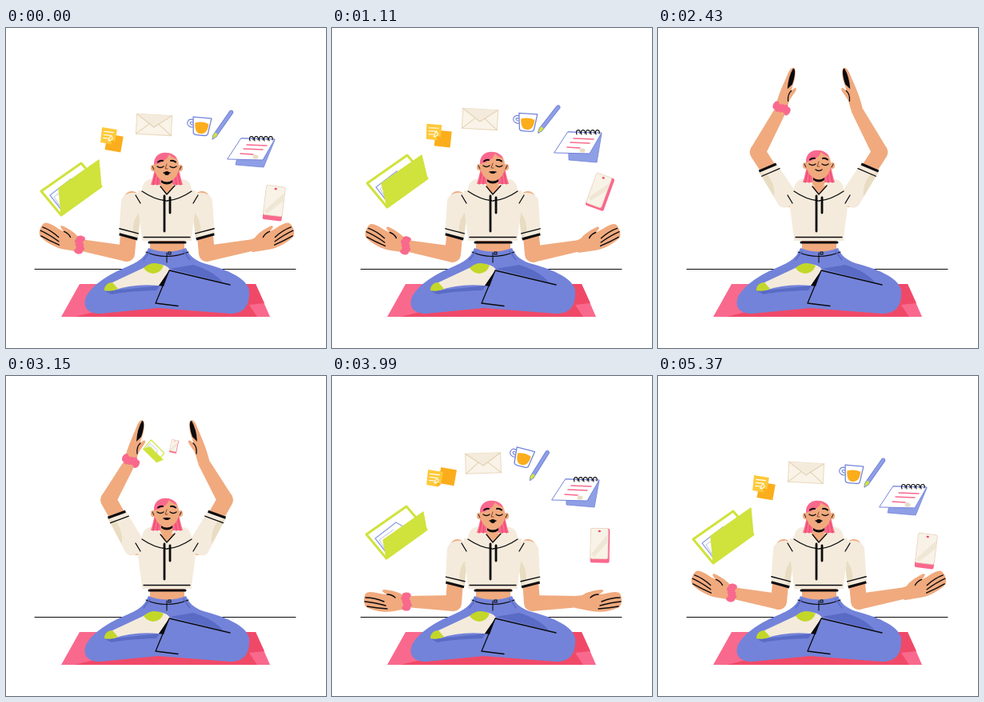
Recreate the animation shown at these times as an HTML page with a canvas. Size 400 px wide and 400 px high, loop 5400 ms.

```html
<!DOCTYPE html>
<html>
<head>
<meta charset="utf-8">
<title>Calm juggling</title>
<style>
html, body { margin: 0; width: 100%; height: 100%; overflow: hidden; background: #fff }
canvas { display: block }
</style>
</head>
<body>
<canvas id="stage" width="400" height="400"></canvas>
<script>
const ctx = document.getElementById('stage').getContext('2d');
const LOOP = 5400, STEP = 30, DEG = Math.PI / 180;
const INK = '#0b0b0f', SKIN = '#f0aa7e', CREAM = '#f4ebdc', SAND = '#e8dcc2', BLUE = '#7383d9', PALE = '#8f9fe6',
  NAVY = '#596bc5', LIME = '#d0e23c', PINK = '#f9698d', RED = '#f04968', ORANGE = '#fbad1c', YELLOW = '#fdc93b';
ctx.lineJoin = 'round';

// Fill and/or stroke an SVG path string
function draw(d, fill, line, width = 1.3) {
  const path = new Path2D(d);
  if (fill) { ctx.fillStyle = fill; ctx.fill(path); }
  if (line) { ctx.strokeStyle = line; ctx.lineWidth = width; ctx.stroke(path); }
}
const stroke = (d, color = INK, width) => draw(d, null, color, width);

function dot(x, y, rx, ry, fill) {
  ctx.beginPath();
  ctx.ellipse(x, y, rx, ry, 0, 0, 7);
  ctx.fillStyle = fill;
  ctx.fill();
}
function at(x, y, turn, scale, paint) {
  ctx.save();
  ctx.translate(x, y);
  ctx.rotate(turn * DEG);
  ctx.scale(scale, scale);
  paint();
  ctx.restore();
}
// Paint once as is and once mirrored about the body axis
function both(paint) {
  paint(true);
  ctx.save();
  ctx.translate(402, 0);
  ctx.scale(-1, 1);
  paint(false);
  ctx.restore();
}

// Smooth, overshoot-free interpolation of rows [time, ...values]
function track(keys, t) {
  let i = 0;
  while (i < keys.length - 2 && t >= keys[i + 1][0]) i++;
  const k0 = keys[i], k1 = keys[i + 1], span = k1[0] - k0[0], u = (t - k0[0]) / span, w = 1 - u;
  const slope = (j, c) => (keys[j + 1][c] - keys[j][c]) / (keys[j + 1][0] - keys[j][0]);
  const tangent = (j, c) => {
    if (!j || j === keys.length - 1) return 0;
    const a = slope(j - 1, c), b = slope(j, c);
    return a * b > 0 ? 2 * a * b / (a + b) : 0;
  };
  return k0.slice(1).map((v, n) => v * w * w * (1 + 2 * u) + k1[n + 1] * u * u * (3 - 2 * u)
    + span * u * w * (w * tangent(i, n + 1) - u * tangent(i + 1, n + 1)));
}

// Left arm: time, elbow, wrist, hand angle
const SHOULDER = 214;
const shoulderX = elbowX => 157 + Math.max(0, Math.min(9, (152 - elbowX) / 5));
const armKeys = [
  [0, 151, 282, 92, 271, 20],
  [1350, 151, 283, 92, 272, 19],
  [1710, 126, 273, 74, 247, 15],
  [1920, 106, 256, 63, 229, 13],
  [2100, 98, 212, 84, 158, 57],
  [2280, 112, 171, 144, 114, 101],
  [2500, 127, 153, 156, 99, 106],
  [3150, 128, 155, 156, 106, 105],
  [3300, 108, 180, 111, 121, 78],
  [3600, 115, 253, 74, 225, 12],
  [3990, 152, 284, 93, 282, 0],
  [4500, 151, 283, 90, 276, 10],
  [4800, 151, 283, 92, 271, 26],
  [LOOP, 151, 282, 92, 271, 20]
].map(([t, ex, ey, wx, wy, turn]) => {
  const polar = (x, y) => [(Math.atan2(y, x) / DEG + 360) % 360, Math.hypot(x, y)];
  const sx = shoulderX(ex);
  return [t, sx, ...polar(ex - sx, ey - SHOULDER), ...polar(wx - ex, wy - ey), turn];
});

// Time, head lift, mouth opening, smile
const faceKeys = [
  [0, 0, 2.5, 0], [1110, -1, 1.6, 0], [1920, -2, .3, 1], [2400, -3, .3, 1],
  [3150, -3, 1.5, 0], [3990, 0, 2.4, 0], [4800, -1, .6, .6], [LOOP, 0, 2.5, 0]
];

function folder(fx, fy) {
  const slab = (x, y) => `M0 0L${x} ${y}l50-35L50-36Z`;
  ctx.translate(-13, 33);
  draw(slab(-25, -30), '#fff', LIME, 3);
  draw('M0-7L-14-25L12-45L38-30Z', '#fff', PALE);
  stroke('M-2-12L-9-23L9-36', '#b9c1f0', 1);
  draw(slab(fx, fy), LIME, LIME);
}
function notes(dx, dy) {
  at(dx, dy, 4, 1, () => draw('M-10-10h20v20h-20Z', ORANGE));
  draw('M-9-10L10-9L9 6L5 10L-9 9Z', YELLOW);
  draw('M9 6L4 5L5 10Z', ORANGE);
  stroke('M-6-5H6M-6-1H4M-6 3H0M2 6C0 2 3-1 5 1S2 7 0 5', '#fff', 1.1);
}
function envelope() {
  draw('M-22-12.5h44v25h-44Z', '#f9f3e8', '#ead9bd', 1);
  draw('M-22-12.5L0 3L22-12.5Z', CREAM);
  stroke('M-22 12.5L-6-1M22 12.5L6-1M-22-12.5L0 3L22-12.5', '#e2d0b1', 1);
}
function cup() {
  stroke('M-9-7C-16-10-19-2-14 1Q-11 3-8 1M-9-4C-14-6-15-2-10-1', BLUE, 1.1);
  draw('M-10-11H13L10 9Q9 11 6 11H-4Q-7 11-8 9Z', '#fff', BLUE);
  draw('M-7-4Q2-7 10-4C10 4 7 9 1 9S-7 3-7-4Z', ORANGE);
}
function pencil() {
  draw('M-17-2.2H20Q23 0 20 2.2H-17L-22 0Z', PALE, BLUE, 1);
  draw('M-17-2h4v4h-4L-21 0Z', LIME);
}
function notepad(x, y) {
  draw(`M29-12L${x} ${y}l-35-3L-13-14Z`, PALE, BLUE, .8);
  draw('M-13-14L29-13L14 13L-30 12Z', '#fff', BLUE, 1);
  stroke('M-6-6L19-5M-10-1L14 0M-14 5L2 6', PINK, 1.5);
  dot(5, 9, 3.5, 2.6, SAND);
  for (let i = 0; i < 5; i++) stroke(`M${i * 6 - 2}-11c-3-7 6-7 4-1`, INK, 1.1);
}
function phone(side, base) {
  const rect = (w, h, fill, line) => {
    ctx.beginPath();
    ctx.roundRect(-12, -21.5, w, h, 2);
    ctx.fillStyle = fill;
    ctx.fill();
    if (line) { ctx.strokeStyle = line; ctx.lineWidth = .7; ctx.stroke(); }
  };
  rect(24, 43, PINK);
  rect(24 - side, 43 - base, '#f8f2e7', SAND);
  draw(`M-11 11L${11 - side}-14v10L-7 14Z`, '#efe6d5');
  dot(-side / 2, -18, 1.7, 1.3, RED);
}

// Poses [x, y, turn, a, b]; items vanish overhead, then fly back out a little too far
const items = [];
function juggle(paint, rest, lift, spread, back, small) {
  const key = (t, [x, y, turn, a = 0, b = 0], s = 1) => [t, x, y, turn, s, a, b];
  const [x, y, turn, a, b] = back;
  const gone = [200, 80, turn + 80, a, b];
  const push = v => 200 + (v - 200) * 1.15;
  const emerge = small
    ? [key(3030, gone, 0), key(3150, [...small, a, b], .38)]
    : [key(3150, gone, 0)];
  items.push({
    paint,
    keys: [key(0, rest), key(400, rest), key(1110, lift), key(1500, lift), key(1920, spread), key(2280, gone, 0),
      ...emerge, key(3600, [push(x), push(y), turn, a, b]), key(3990, back), key(4800, lift), key(LOOP, rest)]
  });
}
juggle(folder, [82, 201, 0, -3, -34], [82, 191, 0, -7, -30], [94, 172, -4, -8, -28], [81, 195, 0, -4, -23], [185, 94, 80]);
juggle(notes, [128, 135, 6, 8, 8], [127, 130, 2, 12, 8], [138, 123, 7, 1, -2], [128, 128, 6, 16, -4]);
juggle(envelope, [185, 121, 3], [185, 114, 3], [186, 113, 0], [189, 109, -2]);
juggle(cup, [243, 123, 5], [243, 118, 4], [239, 112, 9], [238, 102, 15]);
juggle(pencil, [270.5, 121, -55], [271, 114, -52], [260, 111, -56], [259, 112, -58]);
juggle(notepad, [307, 152, 0, 15, 22], [308, 144, 0, 23, 24], [296, 132, 0, 17, 20], [305, 143, 0, 23, 21]);
juggle(phone, [335, 219, 7, 0, 6], [335, 205, 20, 4, 3], [327, 180, 2, 0, 6], [335, 212, 1, 2, 5], [210, 88, 12]);

function ground() {
  stroke('M36 301.5H362', INK, 1);
  draw('M92 320H312L330 361H69Z', PINK);
  draw('M250 320H312L323 344L304 346L314 361H86L150 345Z', RED);
}

function legs() {
  draw('M180 264h43v20h-43Z', SKIN);
  draw('M178 275C174 285 169 291 150 299C128 308 108 321 100 336C95 350 103 357 118 357L190 350L280 357'
    + 'C297 357 305 348 304 328C301 311 270 300 247 294C235 290 229 284 225 275Q201 284 178 275Z', BLUE);
  draw('M205 301L234 296Q260 304 271 318Z', NAVY);
  draw('M124 329L192 322L188 328Q150 329 132 333Z', NAVY);
  draw('M131 319L178 297Q198 292 205 302L191 322Q160 319 134 328Z', CREAM);
  draw('M172 300Q183 290 197 297Q194 306 184 307Q176 306 172 300ZM123 326Q125 318 133 318L140 326Q132 330 123 328Z', '#c3d729');
  draw('M204 303L191 322L197 323Z', INK);
  stroke('M215 347.5L187 344L204 303L280 321');
  stroke('M175 280Q200 291 228 280M201 281V293M203 283h3v-3h-3Z', INK, 1.1);
  both(() => stroke('M172 290L180 279', NAVY));
}

function hand(turn, height) {
  if (turn > 62) {
    ctx.rotate((turn - 105) * DEG);
    draw('M-8-1C-4-18 3-32 7-42C10-50 13-52 16-50C18-44 16-34 13-27L12-22C16-27 19-26 18-23C16-18 11-14 9-8L6 3Z', SKIN);
    draw('M14-50C18-50 16-38 13-30L7-24Q8-40 14-50Z', INK);
    stroke('M12-22Q7-18 8-9');
    return;
  }
  ctx.rotate(turn * DEG);
  ctx.scale(1, height);
  draw('M5-7L-4-8C-10-12-18-14-27-15C-32-15-31-12-24-9C-34-9-42-14-50-11C-54-8-54 4-50 7C-40 12-26 14-16 12L5 8Z', SKIN);
  stroke('M-51-5q11 0 23 5M-52 0q12 1 26 5M-49 6q11 2 25 3M-24-9q6 0 10 4', INK, 1.4);
}

function arm([sx, a1, l1, a2, l2, turn], band) {
  const ex = sx + l1 * Math.cos(a1 * DEG), ey = SHOULDER + l1 * Math.sin(a1 * DEG);
  const wx = ex + l2 * Math.cos(a2 * DEG), wy = ey + l2 * Math.sin(a2 * DEG);
  ctx.lineCap = 'round';
  stroke(`M${sx} ${SHOULDER}L${ex} ${ey}`, SKIN, 20);
  at(ex, ey, a2, 1, () => draw(`M0-10L${l2}-7v14L0 10Z`, SKIN));
  at(wx, wy, 0, 1, () => hand(turn, 1 - (sx - 157) / 45));
  if (band) at(wx, wy, a2, 1, () => {
    for (let i = -2; i <= 2; i++) dot(i % 2 * 1.5, i * 4, 5.5, 3.6, PINK);
  });
  at(sx, SHOULDER, a1, 1, () => {
    draw('M0-14C-12-12-11 9 2 13L44 12L48-12Z', CREAM);
    draw('M12-13Q24-3 41-5L48-12Z', SAND);
    stroke('M38 12L42-12');
    ctx.lineCap = 'butt';
    stroke('M45 11.5L49-11.5', INK, 3.2);
    ctx.lineCap = 'round';
  });
}

function torso() {
  both(() => draw('M202 203H165C163 225 169 245 170 266H202Z', CREAM));
  stroke('M172 261.5H230');
  stroke('M179 268H224', INK, 3);
  both(() => {
    draw('M202 189H183C176 188 170 193 170 204Q186 215 202 216Z', CREAM);
    stroke('M162 209l6 10M170 204Q186 215 201 216');
  });
}

function head([lift, open, smile]) {
  at(0, lift, 0, 1, () => {
    both(() => draw('M202 168H187Q185 184 181 196H202Z', PINK));
    both(() => stroke('M187 182l-3 14M190 187l-1 9', RED));
    draw('M194 182H208V198L201 207L193 198Z', SKIN);
    draw('M194 190Q201 195 208 190V193Q201 198 194 193Z', INK);
    both(() => {
      dot(184, 175, 3, 4, SKIN);
      stroke('M183 173l2 4', INK, .9);
    });
    draw('M185 172C184 151 216 151 216 172C217 184 209 192 201 192S185 184 185 172Z', SKIN);
    draw('M185 171C184 151 210 153 214 164Q207 162 204 158Q200 168 185 171Z', PINK);
    both(() => {
      stroke('M190 167.5q3-2.5 6-1.5', INK, 2);
      stroke('M189 173q4 3 8 0');
    });
    stroke('M201 170l-2 6h3', '#8a4a32', 1);
    stroke(`M197 ${181 - smile}Q201 ${181 + smile * 2} 205 ${181 - smile}`);
    dot(201, 181.5, 3 - smile, open, INK);
  });
  draw('M193 198L201 208L211 197', SKIN, INK);
  stroke('M198 210v44M205 212v19', INK, 2.8);
}

function render(t) {
  ctx.fillStyle = '#fff';
  ctx.fillRect(0, 0, 400, 400);
  ground();
  legs();
  const pose = track(armKeys, t);
  both(left => arm(pose, left));
  torso();
  head(track(faceKeys, t));
  for (const { paint, keys } of items) {
    const [x, y, turn, scale, a, b] = track(keys, t);
    if (scale > .01) at(x, y, turn, scale, () => paint(a, b));
  }
}

function tick() {
  render(Math.floor(performance.now() % LOOP / STEP) * STEP);
  requestAnimationFrame(tick);
}
tick();
</script>
</body>
</html>
```
